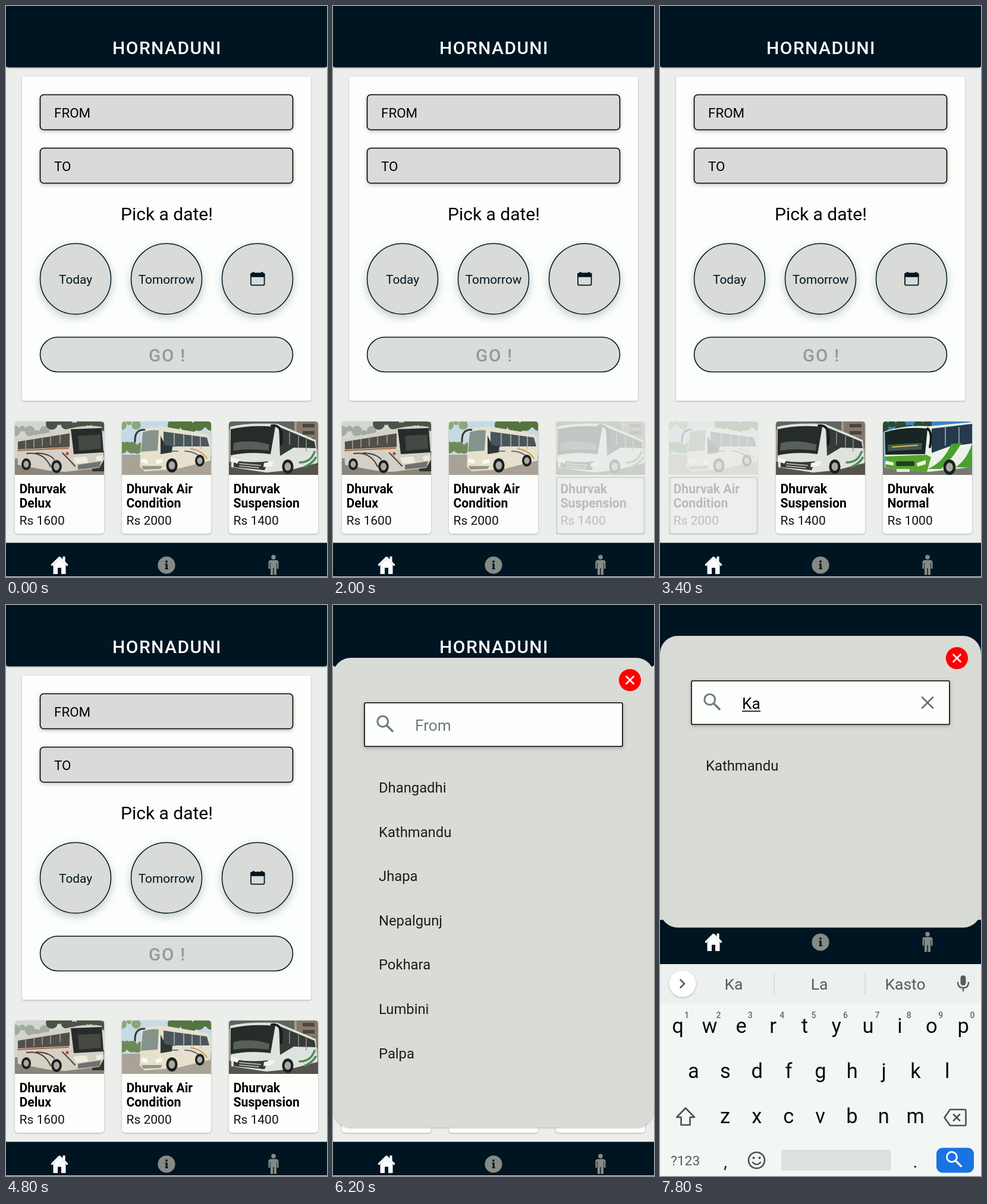
Recreate the animation shown at these times as an HTML page. Size 540 px wide and 962 px high, loop 8000 ms.

```html
<!DOCTYPE html>
<html lang="en">
<head>
<meta charset="utf-8">
<title>Bus booking</title>
<style>
  html, body { margin: 0; width: 100%; height: 100%; overflow: hidden; background: #ebeeea; }
  svg { display: block; width: 100vw; height: 100vh; }
  text { font-family: Roboto, Arial, sans-serif; white-space: pre; }
  .soft { filter: drop-shadow(0 1px 1.5px rgba(0, 0, 0, .25)); }
  .raised { filter: drop-shadow(0 2px 3px rgba(0, 0, 0, .25)); }
  .lift { filter: drop-shadow(0 5px 7px rgba(0, 20, 30, .22)); }
  .photo { filter: blur(.7px); }
  .line { fill: none; stroke-linecap: round; stroke-linejoin: round; }
</style>
</head>
<body>
<svg id="stage" viewBox="0 0 540 962" xmlns="http://www.w3.org/2000/svg"></svg>
<script>
const LOOP = 8000, STEP = 200;
const NAVY = '#001522', PAPER = '#fbfefa', GREY = '#d8dbd7', INK = '#565c59', DIM = '#858a84';

const text = (x, y, size, str, fill = '#000', extra = '') =>
  `<text x="${x}" y="${y}" font-size="${size}" fill="${fill}" ${extra}>${str}</text>`;
const mid = (x, y, size, str, fill, extra = '') => text(x, y, size, str, fill, 'text-anchor="middle" ' + extra);
const rect = (x, y, w, h, fill, r = 0, extra = '') =>
  `<rect x="${x}" y="${y}" width="${w}" height="${h}" rx="${r}" fill="${fill}" ${extra}/>`;
const circle = (x, y, r, fill, extra = '') => `<circle cx="${x}" cy="${y}" r="${r}" fill="${fill}" ${extra}/>`;
const shape = (d, fill) => `<path d="${d}" fill="${fill}"/>`;
const line = (d, stroke, w = 2.5) => `<path class="line" d="${d}" stroke="${stroke}" stroke-width="${w}"/>`;
const group = (id, body, extra = '') => `<g id="${id}" ${extra}>${body}</g>`;
const at = (x, y, body) => `<g transform="translate(${x} ${y})">${body}</g>`;
const outline = (color, w = 1.6) => `stroke="${color}" stroke-width="${w}"`;
const wheel = (x, y, r) =>
  `<ellipse cx="${x}" cy="${y}" rx="${r * .8}" ry="${r}" fill="#1d2021"/>` +
  `<ellipse cx="${x}" cy="${y}" rx="${r * .45}" ry="${r * .58}" fill="#a9aaa4"/>`;
const lens = (x, y, size, color) =>
  circle(x - size * .2, y - size * .2, size * .47, 'none', outline(color, size * .16)) +
  line(`M${x + size * .17} ${y + size * .17}L${x + size * .66} ${y + size * .66}`, color, size * .19);
const cross = (x, y, r, color, w) => line(`M${x - r} ${y - r}l${2 * r} ${2 * r}m0 ${-2 * r}l${-2 * r} ${2 * r}`, color, w);

const trees = (color, x0, x1, n, y, r) => Array.from({ length: n }, (_, i) =>
  circle(x0 + i * (x1 - x0) / (n - 1), y + 4 * Math.sin(i * 4.7), r + 2 * Math.cos(i * 2.9), color)).join('');

const photos = [
  rect(0, 0, 150, 90, '#d3d5d2') + trees('#a4aba0', 0, 50, 5, 16, 7) + trees('#4a5345', 62, 150, 8, 4, 8) +
  shape('M0 62H150V90H0Z', '#8b847a') + shape('M130 50H150V84H130Z', '#33342f') +
  shape('M3 29L92 12Q120 5 146 9L150 64L142 78L84 85L58 83L5 73Z', '#d4d0c5') +
  shape('M5 34L92 20V43L5 47Z', '#514f49') +
  shape('M94 13L146 11L149 52L99 55Z', '#272b2a') +
  shape('M106 24L144 22L145 46L108 49Z', '#454843') +
  [18, 32, 46, 60, 76].map(x => line(`M${x} ${35 - x * .15}v13`, '#a8a297', 1.5)).join('') +
  line('M5 49L90 45', '#a8643c', 1.8) +
  line('M20 54Q48 50 60 76M36 53Q58 54 66 64M80 53Q90 63 101 75', '#4b4138', 2) +
  circle(88, 54, 2.6, '#c64033') +
  shape('M98 61L120 59L124 69L102 71ZM136 59L147 57V65L138 67Z', '#eeecdd') +
  shape('M106 73L145 67L142 77L106 81Z', '#6f7170') +
  wheel(19, 72, 10) + wheel(70, 76, 11),

  rect(0, 0, 150, 90, '#c6dae6') + trees('#6f8a59', 0, 34, 5, 44, 8) + trees('#56743f', 88, 150, 7, 6, 9) +
  trees('#8ba87a', 0, 24, 3, 6, 6) +
  rect(0, 56, 150, 34, '#aaa296') +
  shape('M33 14Q42 9 72 9L143 21L149 30V66L92 80L38 84L30 76Z', '#e6e1cd') +
  shape('M35 18Q50 13 62 15L60 49L32 51Z', '#86938d') +
  shape('M70 17L143 27L147 42L92 42L70 44Z', '#4a565c') +
  shape('M65 24L73 40L85 42L84 52L65 55Z', '#2e3638') +
  [88, 104, 118, 132].map(x => line(`M${x} ${x * .13 + 9}v20`, '#b9bbb3', 1.5)).join('') +
  line('M106 50Q125 50 138 66', '#5a679f', 2) + line('M116 46Q133 48 143 62', '#cf9955', 2) +
  line('M84 50H94', '#6a74a0', 2) +
  line('M38 14Q21 13 22 34', '#33383a', 3) +
  shape('M33 62L43 65V71L33 69ZM56 66L68 62V69L58 72Z', '#fafaf0') +
  shape('M33 75L68 75L65 80L36 81Z', '#94948a') +
  wheel(84, 74, 12) + wheel(131, 66, 10),

  rect(0, 0, 150, 90, '#a39a8a') + shape('M0 0H110V18L0 14Z', '#5d665f') +
  rect(114, 0, 36, 46, '#85786a') + [4, 16, 28].map(y => rect(124, y, 20, 6, '#4b463d')).join('') +
  rect(0, 68, 150, 22, '#55534c') +
  shape('M2 9Q28 2 82 4L146 31L149 70L102 82L63 86L4 77Z', '#dfe3de') +
  shape('M3 13Q38 5 78 9L70 55Q35 50 3 57Z', '#262c29') +
  shape('M8 36Q38 30 68 39L67 49Q35 45 7 49Z', '#565f58') +
  shape('M84 9L144 34L146 45L109 44L86 58Z', '#343b38') +
  [102, 117, 130].map(x => line(`M${x} ${x * .4 - 22}v20`, '#8d968f', 1.5)).join('') +
  line('M72 7Q92 4 88 38', '#191c1c', 4) +
  line('M119 69Q138 69 144 51M128 76Q140 71 146 61', '#4f8a58', 3.5) +
  shape('M8 65Q34 71 66 67L60 82L8 77Z', '#343937') +
  line('M18 71L53 74M18 75L50 78', '#aab0ab', 2) +
  shape('M3 60L18 65L14 71L3 67ZM59 70L78 66L72 75L58 77Z', '#f4f5ec') +
  wheel(99, 76, 12),

  rect(0, 0, 150, 90, '#3c87c5') + trees('#2d4a33', 0, 75, 6, 8, 8) +
  rect(0, 70, 150, 20, '#7a7770') +
  shape('M2 17Q38 5 77 8L150 1V77L75 85L3 78Z', '#edf2e8') +
  shape('M3 18Q38 8 75 12L71 55L4 56Z', '#192522') +
  shape('M8 39L66 36L65 47L8 50Z', '#41594f') +
  shape('M82 12L150 4V37L112 42L82 53Z', '#263a4d') +
  [105, 128].map(x => line(`M${x} 10v30`, '#8799a0', 2)).join('') +
  shape('M3 59L73 56L81 60L74 85L4 78Z', '#54a52c') +
  shape('M75 80Q102 69 115 38L132 36Q121 58 98 80ZM122 77Q141 65 150 37V78Z', '#48a12e') +
  line('M16 43L58 40', '#ddb84e', 2) +
  shape('M5 66L18 69V74L4 72ZM57 70L72 65V72L58 76Z', '#f4f6e8') +
  rect(22, 67, 31, 8, '#263b22', 2) + rect(23, 80, 22, 5, '#e5e8e0') +
  line('M75 12Q84 18 79 43', '#161a19', 4) + wheel(112, 77, 13)
];

const buses = [['Delux', '', 1600], ['Air', 'Condition', 2000], ['Suspension', '', 1400], ['Normal', '', 1000]];
const busCard = ([a, b, price], i) => {
  const first = b ? 'Dhurvak ' + a : 'Dhurvak', second = b || a;
  return at(15 + i * 180, 700,
    rect(1.5, 94, 147, 95, '#e9ece9', 2, `id="frame${i}" ${outline('#cbcfcb', 2.6)} opacity="0"`) +
    group('bus' + i,
      rect(0, 0, 150, 189, PAPER, 5, 'class="soft"') +
      `<g clip-path="url(#photo)"><g class="photo">${photos[i]}</g></g>` +
      text(7.5, 120.5, 21.2, first, '#000', 'font-weight="700"') +
      text(7.5, 145, 21.2, second, '#000', 'font-weight="700"') +
      text(7.5, 173.5, 21, 'Rs ' + price, '#111')));
};

const field = (y, label) =>
  rect(57.5, y, 425, 59, GREY, 6, 'class="raised" ' + outline('#000')) + text(81, y + 38.7, 22.4, label);
const dayButton = (x, label) =>
  circle(x, 459.7, 59.5, GREY, 'class="lift" ' + outline(NAVY, 1.5)) + mid(x, 468, 20.8, label, NAVY);

const page =
  rect(0, 0, 540, 962, '#ebeeea') +
  `<path class="soft" d="M0 0H540V100Q540 103.6 536 103.6H4Q0 103.6 0 100Z" fill="${NAVY}"/>` +
  mid(271, 80.5, 30, 'HORNADUNI', PAPER, 'font-weight="500" letter-spacing="1.4"') +
  rect(27, 119, 486, 546, PAPER, 3, 'class="soft"') +
  field(149.5, 'FROM') + field(239.5, 'TO') +
  mid(270.5, 361, 30, 'Pick a date!') +
  dayButton(117, 'Today') + dayButton(270, 'Tomorrow') + dayButton(423, '') +
  rect(412, 450.5, 22.6, 19.8, 'none', 2, outline(NAVY, 1.8)) + rect(411.2, 449.7, 24.2, 7, NAVY, 2) +
  rect(415, 448, 2.6, 4, NAVY) + rect(429, 448, 2.6, 4, NAVY) +
  rect(57.5, 558, 425, 58.5, '#dadeda', 29.3, outline(NAVY)) +
  mid(271.5, 599, 29.5, 'GO !', '#969a96', 'font-weight="500" letter-spacing="1.8"') +
  group('cards', buses.map(busCard).join(''));

const nav = group('nav',
  rect(0, 904.4, 540, 74.6, NAVY) +
  line('M77.5 941.5L90 929.3L102.5 941.5', '#fff', 3.4) +
  shape('M79.5 942L90 931.5L100.5 942V957H93V946.5H87V957H79.5ZM95.5 927.5H99.5V937L95.5 933Z', '#fff') +
  circle(270, 942, 14.6, DIM) +
  rect(268.5, 939.5, 3.2, 9.5, NAVY) + rect(267.4, 939.5, 3, 1.6, NAVY) + rect(267.4, 947.4, 5.4, 1.6, NAVY) +
  circle(270, 936, 1.9, NAVY) +
  circle(450, 928.6, 3.8, DIM) +
  shape('M445 933.5H455Q458.5 934 458.5 937V948H455.8V938H455V958.5H450.7V947H449.3V958.5H445V938H444.2V948H441.5V937Q441.5 934 445 933.5Z', DIM));

const towns = ['Dhangadhi', 'Kathmandu', 'Jhapa', 'Nepalgunj', 'Pokhara', 'Lumbini', 'Palpa'];
const sheet = group('sheet',
  rect(0, 0, 540, 791, '#d8dbd6', 30, 'id="panel" class="soft"') +
  circle(499.5, 37.5, 18.6, '#fd0004') + cross(499.5, 37.5, 6, '#fff', 2.6) +
  rect(53, 75.7, 434, 73.6, PAPER, 2, 'class="raised" ' + outline('#000')) +
  lens(87.5, 111, 19, '#747a77') +
  text(138, 123, 26.2, 'From', '#747a77', 'id="query"') +
  rect(138, 126, 31, 1.6, '#000', 0, 'id="under"') +
  group('clear', cross(450, 112.5, 9, '#686d6a', 2.6)) +
  `<g clip-path="url(#list)">` +
  towns.map((t, i) => text(77, 227 + i * 74.6, 23.8, t, '#1b1e1c', 'class="town"')).join('') + '</g>' +
  rect(481.5, 180, 6, 288, '#999d99', 0, 'id="thumb"'));

const cells = [['QWERTYUIOP', 30, 724], ['ASDFGHJKL', 56.5, 800], ['ZXCVBNM', 109.5, 876]];
const letters = lower => cells.map(([row, x, y]) => [...(lower ? row.toLowerCase() : row)].map((c, i) =>
  mid(x + i * 53.35, lower ? y - 3 : y, 34.5, c, '#0b0d0c')).join('')).join('');
const arrow = 'M43 847.5L58 863H50.5V876H35.5V863H28Z';
const teeth = Array.from({ length: 8 }, (_, i) =>
  rect(-3, -12.5, 6, 6, INK, 1.5, `transform="rotate(${i * 45})"`)).join('');

const tools =
  line('M41 631.5L34.5 638L41 644.5', INK, 2.6) +
  line('M98 627H116Q118 627 118 629V640L109 649H98Q96 649 96 647V629Q96 627 98 627ZM118 640H111Q109 640 109 642V649M101 640Q106 645 110 639', INK) +
  circle(102, 634, 1.6, INK) + circle(111, 634, 1.6, INK) +
  mid(183, 645, 20, 'GIF', INK, 'font-weight="900" letter-spacing="1"') +
  rect(250, 628, 20, 22, 'none', 2, outline(INK, 2.6)) + rect(255, 624.5, 10, 6, INK, 2) +
  line('M254.5 635.5H265.5M254.5 640H265.5M254.5 644.5H262', INK, 2) +
  at(337, 639, teeth + circle(0, 0, 6.8, 'none', outline(INK, 5))) +
  rect(384, 622, 1.5, 33, '#d0d4d2') +
  [423.5, 433, 442.5].map(x => circle(x, 638, 2.9, INK)).join('');
const hints =
  line('M34.5 631.5L41 638L34.5 644.5', INK, 2.6) +
  mid(124, 648, 26.5, 'Ka', INK) + mid(268, 648, 26.5, 'La', INK) + mid(412.5, 648, 26.5, 'Kasto', INK) +
  rect(191.5, 620, 1.5, 36, '#d0d4d2') + rect(344.5, 620, 1.5, 36, '#d0d4d2');

const keyboard = group('keyboard',
  rect(0, 605, 540, 357, '#f2f7f4') + rect(0, 605, 540, 66, '#ecf0ee') +
  circle(38, 638, 22.5, '#fff', 'class="soft"') +
  group('tools', tools) + group('hints', hints) +
  rect(505.5, 624, 9, 17, INK, 4.5) + line('M501 636Q501 645 510 645Q519 645 519 636M510 645V650', INK, 2.4) +
  [...'1234567890'].map((d, i) => mid(45 + i * 53.4, 696, 14, d, '#626765', 'font-weight="500"')).join('') +
  group('upper', letters(false) + shape(arrow, '#4a504d')) +
  group('lower', letters(true) + line(arrow, '#4a504d', 2.6)) +
  line('M488 850H513Q514.5 850 514.5 852V875Q514.5 877 513 877H488L478.5 863.5Z', '#4a504d', 2.6) + cross(499, 863.5, 5, '#4a504d', 2.6) +
  text(18, 944, 22.8, '?123', INK) + mid(110, 948, 30, ',', '#222') + mid(429.5, 948, 30, '.', '#222') +
  circle(162.5, 935.5, 13.5, 'none', outline('#4a504d', 2.6)) +
  circle(157.5, 931.5, 2, '#4a504d') + circle(167.5, 931.5, 2, '#4a504d') + line('M156 939Q162.5 946 169 939', '#4a504d', 2.4) +
  rect(204, 918, 184.5, 35, '#dce0de', 4) +
  rect(465, 914.5, 63, 42, '#1a73e3', 10) + lens(494.5, 933.5, 18, '#fff'));

const stage = document.getElementById('stage');
stage.innerHTML =
  `<defs><clipPath id="photo"><path d="M0 90V5Q0 0 5 0H145Q150 0 150 5V90Z"/></clipPath>
  <clipPath id="list"><rect id="listBox" x="0" y="180" width="540" height="536"/></clipPath></defs>` +
  page + nav + rect(0, 961, 540, 1, '#dfe4e2') + sheet + keyboard;

const $ = id => document.getElementById(id);
const set = (id, name, value) => $(id).setAttribute(name, value);
const move = (id, x, y) => set(id, 'transform', `translate(${x} ${y})`);
const show = (el, on) => el.setAttribute('visibility', on ? 'visible' : 'hidden');
const ramp = (t, a, b) => Math.min(1, Math.max(0, (t - a) / (b - a)));
const ease = p => 1 - (1 - p) ** 3;
const townEls = [...document.querySelectorAll('.town')];

function press(i, on) {
  set('bus' + i, 'opacity', on ? .2 : 1);
  set('frame' + i, 'opacity', on ? 1 : 0);
}

function draw(t) {
  move('cards', -180 * (ease(ramp(t, 2000, 2600)) - ease(ramp(t, 3400, 4000))), 0);
  press(2, t >= 2000 && t < 2200);
  press(1, t >= 3400 && t < 3600);

  const typing = t >= 6400;
  const top = typing ? 52 : 89, height = typing ? 491.5 : 791;
  move('nav', 0, typing ? -374 : 0);
  show($('sheet'), t >= 5000);
  move('sheet', 0, top + 873 * (1 - ease(ramp(t, 4900, 5200))));
  set('panel', 'height', height);
  set('listBox', 'height', height - 255);
  set('thumb', 'opacity', 1 - ramp(t, 5400, 5800));

  show($('keyboard'), t > 6200);
  move('keyboard', 0, 357 * (1 - ease(ramp(t, 6200, 6600))));

  const query = 'Ka'.slice(0, t >= 7600 ? 2 : t >= 7400 ? 1 : 0);
  $('query').textContent = query || 'From';
  set('query', 'fill', query ? '#000' : '#747a77');
  set('under', 'width', [0, 17, 31][query.length]);
  show($('clear'), query);
  let row = 0;
  townEls.forEach((el, i) => {
    const match = towns[i].startsWith(query);
    show(el, match && t >= 5000);
    if (match) el.setAttribute('y', 227 + 74.6 * row++);
  });
  const up = t > 6200;
  show($('upper'), up && !query);
  show($('lower'), up && query);
  show($('tools'), up && query.length < 2);
  show($('hints'), up && query.length === 2);
}

const start = performance.now();
function tick() {
  const t = (performance.now() - start) % LOOP;
  draw(Math.floor(t / STEP) * STEP);
  requestAnimationFrame(tick);
}
tick();
</script>
</body>
</html>
```
